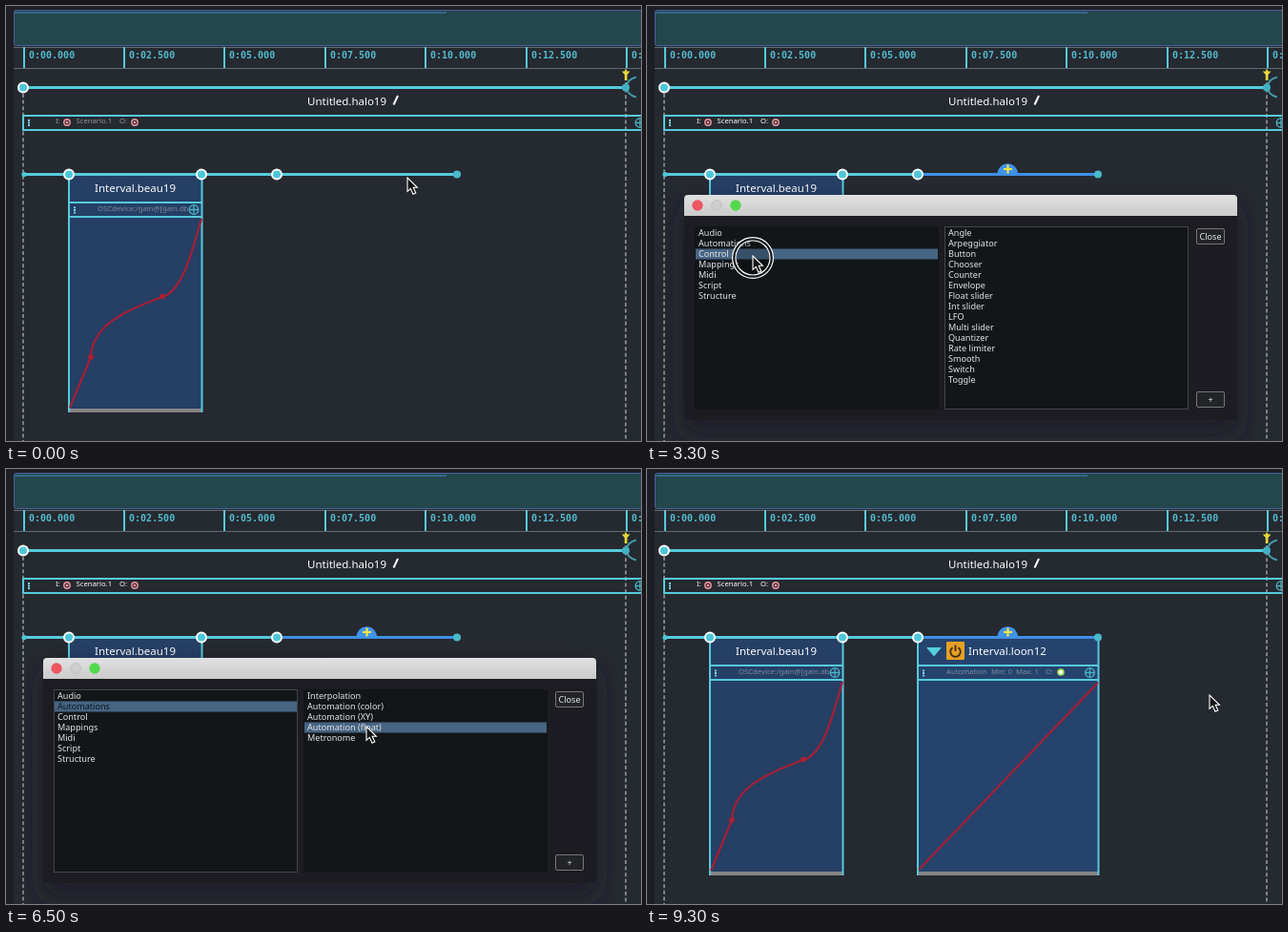
These frames come from a looping animation (666 by 456 pixels, 9.4 s). An HTML page:

```html
<!DOCTYPE html>
<html lang="en">
<head>
<meta charset="utf-8">
<title>Adding an automation</title>
<style>
  html, body { margin: 0; width: 100%; height: 100%; overflow: hidden; background: #1e1f26; }
  svg { display: block; width: 666px; height: 456px; }
  text { font-family: "Noto Sans", "Open Sans", sans-serif; fill: #fff; white-space: pre; }
  .name { font-size: 11.5px; font-weight: 500; }
  .tiny { font-size: 7.7px; }
  .list { font-size: 9.1px; font-weight: 500; fill: #e2e4e6; }
  .time { font: bold 10px "DejaVu Sans Mono", monospace; fill: #52b9cc; }
  .line { fill: none; stroke: #56cadc; stroke-width: 2; }
  .thick { stroke-width: 3; }
  .red { fill: none; stroke: #a31f35; stroke-width: 2.3; }
  .box { fill: #121618; stroke: #42464a; }
  .button { fill: #222427; stroke: #74777a; }
  .dim { fill: #7c8c9f; }
</style>
</head>
<body>
<svg viewBox="0 0 666 456">
  <defs>
    <linearGradient id="bar" x2="0" y2="1">
      <stop stop-color="#e1e1e1"/><stop offset="1" stop-color="#cbcbcb"/>
    </linearGradient>
    <filter id="shadow" x="-10%" y="-20%" width="120%" height="155%">
      <feDropShadow dx="0" dy="14" stdDeviation="12" flood-color="#1d1d25" flood-opacity=".9"/>
    </filter>
    <circle id="node" r="5" fill="#4dc6d9" stroke="#fff" stroke-width="2"/>
    <g id="port">
      <circle r="3.2" fill="#4a2a30" stroke="#eb9aa5" stroke-width="1.4"/>
      <circle r="1.3" fill="#eb9aa5"/>
    </g>
    <g id="target" fill="none" stroke="#48b4c6" stroke-width="1.3">
      <circle r="4.8"/><path d="M-5 0H5M0 -5V5"/>
    </g>
    <path id="grip" d="M0 -3.5V-1.7M0 -.9V.9M0 1.7V3.5" stroke="#7fe3f0" stroke-width="2"/>
  </defs>

  <rect x="8" y="5" width="670" height="460" fill="#252930"/>
  <rect x="8.5" y="4.5" width="670" height="37" rx="2" fill="#23474c" stroke="#4a609b"/>
  <path d="M9 7H462" stroke="#4b83cb"/>
  <path d="M8 43.5H666M8 65.5H666" stroke="#626a72"/>
  <g id="ruler"></g>

  <path d="M18 92V456M650 80V456" stroke="#a3a6a9" stroke-width="1.4" stroke-dasharray="4 2.6"/>
  <path class="line thick" d="M18 85.5H652"/>
  <path d="M661 74.5Q651 77 651 85T661 95.5" fill="none" stroke="#4298a8" stroke-width="2"/>
  <circle cx="650" cy="85.5" r="4" fill="#41b0c2"/>
  <path d="M650 65.5L651.5 68.5H654.5L651.5 72V78H648.8V72L645.8 68.5H648.8Z" fill="#e8d83c"/>
  <use href="#node" x="18" y="85.5"/>
  <text class="name" x="316" y="104">Untitled.halo19</text>
  <path d="M406.5 103.5L411 94" stroke="#fff" stroke-width="2"/>

  <path class="line" d="M670 115H18V130H670"/>
  <use href="#grip" x="24" y="122.5"/>
  <g id="ports">
    <text class="tiny" x="52" y="123">I:</text>
    <text class="tiny" x="73.5" y="123">Scenario.1</text>
    <text class="tiny" x="119" y="123">O:</text>
  </g>
  <use href="#port" x="64" y="122"/>
  <use href="#port" x="135" y="122"/>
  <use href="#target" x="665" y="122.5"/>

  <g>
    <rect x="66" y="176" width="140" height="246" fill="#253f65"/>
    <rect x="66" y="422" width="140" height="4" fill="#858585"/>
    <path class="line" d="M66 176V426M205.5 176V426M66 206H206M66 221H206"/>
    <use href="#grip" x="72" y="214"/>
    <text class="name" x="93" y="195">Interval.beau19</text>
    <text class="tiny dim" x="96" y="214.5">OSCdevice:/gain@[gain.db</text>
    <use href="#target" x="197" y="213.5"/>
    <path class="red" d="M67 421L89 368C90 335 125 319 164 305C185 299 195 258 205 223"/>
    <circle cx="89" cy="368" r="2.8" fill="#b01e30"/>
    <circle cx="164" cy="304.5" r="2.8" fill="#b01e30"/>
  </g>

  <g id="added">
    <rect x="284" y="176" width="190" height="246" fill="#25436d"/>
    <rect x="284" y="422" width="190" height="4" fill="#858585"/>
    <path class="line" d="M284 176V426M473.5 176V426M284 206H474M284 221H474"/>
    <path d="M293 187H309L301 196.5Z" fill="#55d0e0"/>
    <rect x="314" y="181" width="19" height="19" rx="1" fill="#e6a023"/>
    <path d="M320.5 187.2A5.3 5.3 0 1 0 326.5 187.2M323.5 184.5V191" fill="none" stroke="#3b2d18" stroke-width="1.8"/>
    <text class="name" x="337" y="195">Interval.loon12</text>
    <use href="#grip" x="290" y="214"/>
    <text class="tiny dim" x="314" y="214.5">Automation</text>
    <text class="tiny dim" x="361" y="214.5">Min: 0</text>
    <text class="tiny dim" x="387" y="214.5">Max: 1</text>
    <text class="tiny dim" x="418" y="214.5">O:</text>
    <circle cx="434" cy="213" r="2.9" fill="#fff" stroke="#a5dc62" stroke-width="1.8"/>
    <use href="#target" x="464.5" y="213.5"/>
    <path class="red" d="M285 420L473 224"/>
  </g>

  <path class="line thick" d="M18 176.5H473"/>
  <g id="chosen">
    <path d="M284 176.5H473" stroke="#3f8fe6" stroke-width="3"/>
    <path d="M367.5 176A10.7 10.7 0 0 1 389 176Z" fill="#3f93ea"/>
    <path d="M374 171H383M378.5 166.5V175.5" stroke="#f5e63c" stroke-width="2.2"/>
  </g>
  <circle cx="19" cy="176.5" r="2.6" fill="#4dc6d9"/>
  <circle cx="473" cy="176.5" r="4" fill="#48bac9"/>
  <use href="#node" x="66" y="176.5"/>
  <use href="#node" x="205" y="176.5"/>
  <use href="#node" x="284" y="176.5"/>

  <g id="window">
    <g filter="url(#shadow)">
      <rect x="39" y="198" width="580" height="236" rx="4" fill="#1c1d22"/>
      <path d="M39 220V202Q39 198 43 198H615Q619 198 619 202V220Z" fill="url(#bar)"/>
    </g>
    <circle cx="53" cy="209" r="5.7" fill="#ee5660"/>
    <circle cx="73" cy="209" r="5.4" fill="#cdcdcd" stroke="#b9b9b9" stroke-width=".7"/>
    <circle cx="93" cy="209" r="5.7" fill="#53d94b"/>
    <rect class="box" id="leftBox" x="50.5" y="231.5" width="255" height="191"/>
    <rect class="box" id="rightBox" x="312.5" y="231.5" width="255" height="191"/>
    <g id="left"></g>
    <g id="right"></g>
    <rect class="button" x="576.5" y="233.5" width="29" height="16" rx="1.5"/>
    <text class="list" x="591" y="245" text-anchor="middle">Close</text>
    <rect class="button" x="576.5" y="404.5" width="29" height="16" rx="1.5"/>
    <text class="list" x="591" y="416" text-anchor="middle">+</text>
  </g>

  <g id="cursor">
    <g id="ring" fill="none">
      <circle cy="2" r="19.5" fill="#000" fill-opacity=".2" stroke="#111316" stroke-width="4"/>
      <circle cy="2" r="21.4" stroke="#fff" stroke-width="1.2"/>
      <circle cy="2" r="18" stroke="#fff" stroke-width="1.2"/>
    </g>
    <path d="M0 0V14.3L3.3 11.3L6 17.3L8.8 16L6.2 10.3H10.4Z" fill="#111" stroke="#fff" stroke-width="1.1"/>
  </g>
</svg>
<script>
const LOOP = 9400, STEP = 100;
const $ = id => document.getElementById(id);

const groups = {
  Audio: ['Audio input', 'Gain', 'Audio Generator', 'Sound file', 'Envelope', 'Stereo Merger', 'Faust', 'VST'],
  Automations: ['Interpolation', 'Automation (color)', 'Automation (XY)', 'Automation (float)', 'Metronome'],
  Control: ['Angle', 'Arpeggiator', 'Button', 'Chooser', 'Counter', 'Envelope', 'Float slider', 'Int slider',
    'LFO', 'Multi slider', 'Quantizer', 'Rate limiter', 'Smooth', 'Switch', 'Toggle'],
  Mappings: ['Mapping (float)'],
  Midi: ['Chord', 'Pulse to Note', 'Midi scale', 'Quantifier', 'Piano roll'],
  Script: ['Javascript'],
  Structure: ['Scenario']
};
const names = Object.keys(groups);

// time, x, y of the pointer tip
const path = [
  [0, 421, 180], [200, 421, 180], [600, 384, 177], [1100, 384, 177], [1400, 382, 173], [1700, 382, 173],
  [2200, 115, 241], [2500, 115, 241], [2700, 113, 252], [2900, 113, 252], [3100, 111, 262], [3300, 111, 262],
  [3450, 109, 272], [3650, 109, 272], [3800, 108, 283], [4000, 108, 283], [4200, 107, 294], [4900, 107, 295],
  [5400, 112, 250], [5900, 112, 250], [6300, 378, 270], [8000, 378, 270], [8400, 590, 237], [LOOP, 590, 237]
];
const clicks = [700, 1500, 2500, 2800, 3200, 3500, 3900, 4400, 5600, 6300, 7100, 8500];
// time, group whose contents are listed
const picks = [[1800, 'Audio'], [2800, 'Automations'], [3200, 'Control'], [3500, 'Mappings'],
  [3900, 'Midi'], [4400, 'Script'], [5600, 'Automations']];
// time, scale, opacity of the dialog
const zoom = [[0, 0, 0], [1500, 0, 0], [1600, .303, .42], [1700, .72, .75], [1800, 1, 1],
  [8700, 1, 1], [8800, 1, .55], [8900, 1, .18], [9000, 1, 0], [LOOP, 1, 0]];

function sample(keys, t, ease = u => u) {
  const i = Math.max(1, keys.findIndex(k => k[0] >= t));
  const [a, b] = [keys[i - 1], keys[i]];
  const u = ease((t - a[0]) / (b[0] - a[0]));
  return a.slice(1).map((v, j) => v + (b[j + 1] - v) * u);
}

const smooth = u => u * u * (3 - 2 * u);
const show = (id, on) => $(id).setAttribute('visibility', on ? 'visible' : 'hidden');

function rows(x, items, selected, hovered, focused) {
  return items.map((item, i) => {
    const picked = i === selected;
    const fill = picked ? '#466583' : i === hovered ? '#425159' : '';
    const band = fill && `<rect x="${x + 1}" y="${232.5 + i * 11}" width="254" height="11" fill="${fill}"/>`;
    const ink = picked && !focused ? 'style="fill:#10171c"' : '';
    return `${band}<text class="list" x="${x + 4}" y="${241 + i * 11}" ${ink}>${item}</text>`;
  }).join('');
}

function drawLists(t, x, y) {
  const row = Math.floor((y - 232) / 11);
  const overLeft = x > 50 && x < 306 && y > 231;
  const overRight = x > 312 && x < 568 && y > 231;
  const [, group] = picks.filter(p => p[0] <= t).pop() || [];
  $('left').innerHTML = rows(50, names, t < 2500 ? -1 : names.indexOf(group), overLeft ? row : -1, t < 6300);
  $('right').innerHTML = rows(312, groups[group] || [], t < 6300 ? -1 : 3, overRight ? row : -1, t < 8500);
  $('leftBox').style.stroke = overLeft ? '#121618' : '';
  $('rightBox').style.stroke = overRight ? '#121618' : '';
}

function draw(t) {
  const [x, y] = sample(path, t, smooth);
  const [scale, alpha] = sample(zoom, t);
  $('cursor').setAttribute('transform', `translate(${x} ${y})`);
  show('ring', clicks.some(c => t >= c && t < c + 200));
  show('chosen', t >= 700);
  show('added', t >= 7100);
  $('ports').setAttribute('opacity', t < 700 ? .5 : 1);
  show('window', alpha > 0);
  $('window').setAttribute('opacity', alpha);
  $('window').setAttribute('transform', `translate(329 316) scale(${scale}) translate(-329 -316)`);
  drawLists(t, x, y);
}

$('ruler').innerHTML = Array.from({ length: 7 }, (_, i) => {
  const x = Math.round(18.5 + i * 105.4), s = i * 2.5;
  const label = `0:${s.toFixed(3).padStart(6, '0')}`;
  return `<path class="line" d="M${x} 43V65"/><text class="time" x="${x + 5}" y="54.5">${label}</text>`;
}).join('');

let last = -1;
const start = performance.now();
function tick(now) {
  const t = Math.floor(Math.max(0, now - start) % LOOP / STEP) * STEP;
  if (t !== last) draw(last = t);
  requestAnimationFrame(tick);
}
draw(0);
requestAnimationFrame(tick);
</script>
</body>
</html>
```
